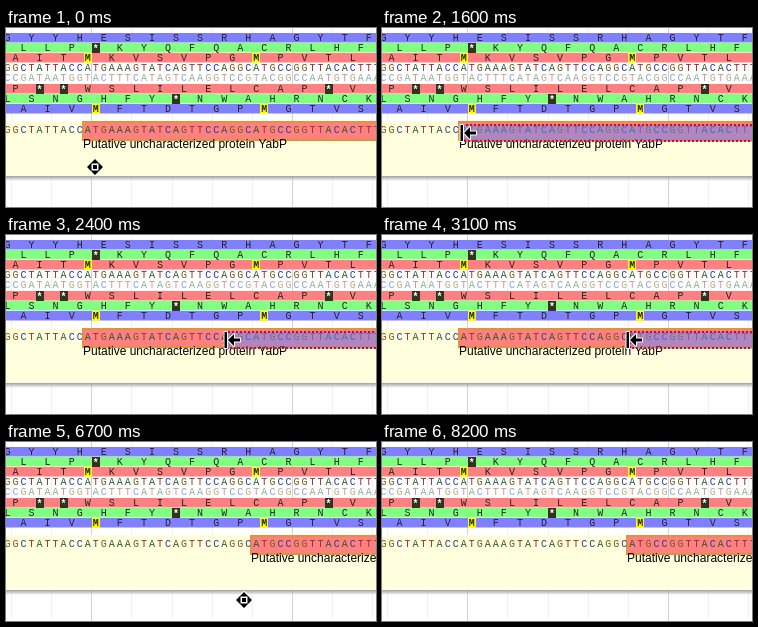
An HTML page with a canvas for the animation above (8600 ms loop, 370 by 179 pixels).

```html
<!DOCTYPE html>
<html lang="en">
<head>
<meta charset="utf-8">
<title>Resizing an exon in a genome browser</title>
<style>
html, body { margin: 0; width: 100%; height: 100%; overflow: hidden; background: #fff; }
canvas { display: block; }
</style>
</head>
<body>
<canvas id="stage" width="370" height="179"></canvas>
<script>
const ctx = document.getElementById('stage').getContext('2d');
const W = 370, H = 179, LOOP = 8600, STEP = 100;
const CELL = 8.03, FIRST = 1.4;
const MONO = '"Liberation Mono", monospace';
const RED = '#ff8080', GREEN = '#80ff80', BLUE = '#8080ff';
const DNA = 'GGCTATTACCATGAAAGTATCAGTTCCAGGCATGCCGGTTACACTTT';
const PAIR = { A: 'T', T: 'A', C: 'G', G: 'C' };
const BASE_COLOR = { A: '#23562b', C: '#2b3f96', G: '#7a5a1e', T: '#963030' };

// Reading frames: top, colour, index of the first base, amino acids.
const FRAMES = [
  [5, BLUE, 0, 'GYYHESISSRHAGYTF'],
  [15, GREEN, 2, 'LLP*KYQFQACRLHF'],
  [25, RED, 1, 'AITMKVSVPGMPVTL'],
  [56, RED, 1, 'P**WSLILELCAP*V'],
  [66, GREEN, 0, 'LSNGHFY*NWAHRNCK'],
  [76, BLUE, 2, 'AIVMFTDTGPMGTVS']
];

// Keys are [time, x, y].
const POINTER = [
  [0, 89, 139], [100, 88, 141], [200, 86, 133], [400, 79, 112], [500, 79, 105],
  [1500, 79, 105], [1600, 86, 105], [2000, 167, 105], [2400, 226, 105],
  [2500, 226, 105], [2600, 243, 105], [2700, 243, 105], [3100, 252, 105],
  [3500, 252, 105], [3600, 247, 113], [3700, 247, 113], [3900, 255, 130],
  [4200, 238, 158], [7300, 238, 158], [7400, 240, 155], [8100, 48, 9]
];
const GHOST = [
  [1600, 79], [2000, 149], [2400, 217], [2500, 217],
  [2600, 228], [2700, 228], [3100, 247]
];

const baseX = i => FIRST + i * CELL;

function at(keys, t, axis) {
  const next = keys.findIndex(k => k[0] > t);
  if (next < 0) return keys[keys.length - 1][axis];
  const a = keys[Math.max(0, next - 1)], b = keys[next];
  return a[axis] + (b[axis] - a[axis]) * (t - a[0]) / (b[0] - a[0] || 1);
}

function rect(x, y, w, h, color) {
  ctx.fillStyle = color;
  ctx.fillRect(x, y, w, h);
}

function letter(ch, x, y, color, weight = '') {
  ctx.font = `${weight} 10px ${MONO}`;
  ctx.textAlign = 'center';
  ctx.fillStyle = color;
  ctx.fillText(ch, x, y);
}

function bases(y, complement) {
  [...DNA].forEach((b, i) => {
    const ch = complement ? PAIR[b] : b;
    letter(ch, baseX(i), y, BASE_COLOR[ch]);
  });
}

function drawGrid() {
  for (let i = -4; i < 47; i += 5) {
    rect(Math.floor(baseX(i) - CELL / 2), 0, 1, H, i % 25 === 11 ? '#d2d2d2' : '#f1f1f1');
  }
}

function drawFrames() {
  for (const [top, color, first, acids] of FRAMES) {
    rect(0, top, W, 9.5, color);
    [...acids].forEach((acid, n) => {
      const x = baseX(first + 3 * n), baseline = top + 8;
      if (acid === 'M') rect(Math.round(x - 4), top, 8, 10, '#ff0');
      if (acid === '*') {
        rect(Math.round(x - 4), top, 8, 10, '#333322');
        letter(acid, x, baseline + 1, '#fff', 'bold');
      } else {
        letter(acid, x, baseline, '#222', acid === 'M' ? 'bold' : '');
      }
    });
  }
}

function drawAnnotation(t) {
  rect(0, 93, W, 55, '#ffffdd');
  const shadow = ctx.createLinearGradient(0, 148, 0, 153);
  shadow.addColorStop(0, '#a0a0a0');
  shadow.addColorStop(1, 'rgba(160,160,160,0)');
  rect(0, 148, W, 5, shadow);

  const left = Math.round(baseX(t < 6700 ? 10 : 31) - CELL / 2);
  rect(left - 2, 93, W, 20, '#e3923c');
  rect(left, 95, W, 16, RED);
  bases(105);
  ctx.font = '12px "Liberation Sans", Arial, sans-serif';
  ctx.textAlign = 'left';
  ctx.fillStyle = '#000';
  ctx.fillText('Putative uncharacterized protein YabP', left - 1, 120);
}

function drawGhost(left) {
  rect(left, 96, W, 18, 'rgba(100,140,255,.5)');
  ctx.strokeStyle = '#f00000';
  ctx.lineWidth = 2;
  ctx.setLineDash([2, 2]);
  ctx.strokeRect(left + 1, 97, W, 16);
  ctx.setLineDash([]);
}

const MOVE = new Path2D('M-2-2h4v4h-4z');
for (let i = 0; i < 4; i++) {
  MOVE.addPath(new Path2D('M0-8L4.5-3.5H-4.5Z'), new DOMMatrix().rotate(90 * i));
}
const RESIZE = new Path2D('M-7.5-8h2.5v16h-2.5zM-4 0L2-6V-1.5H8V1.5H2V6Z');

function drawPointer(shape, x, y) {
  ctx.save();
  ctx.translate(Math.round(x), Math.round(y));
  ctx.strokeStyle = '#fff';
  ctx.lineWidth = 2;
  ctx.lineJoin = 'round';
  ctx.stroke(shape);
  ctx.fillStyle = '#000';
  ctx.fill(shape);
  ctx.restore();
}

function draw(now) {
  const t = Math.floor(now % LOOP / STEP) * STEP;
  rect(0, 0, W, H, '#fff');
  drawGrid();
  drawFrames();
  bases(43);
  ctx.globalAlpha = 0.5;
  bases(53, true);
  ctx.globalAlpha = 1;
  drawAnnotation(t);
  if (t >= 1600 && t < 3600) drawGhost(Math.round(at(GHOST, t, 1)));
  if (t < 8200) {
    const resizing = t >= 500 && t < 3600;
    drawPointer(resizing ? RESIZE : MOVE, at(POINTER, t, 1), at(POINTER, t, 2));
  }
}

const start = performance.now();
function tick() {
  draw(performance.now() - start);
  requestAnimationFrame(tick);
}
tick();
</script>
</body>
</html>
```
